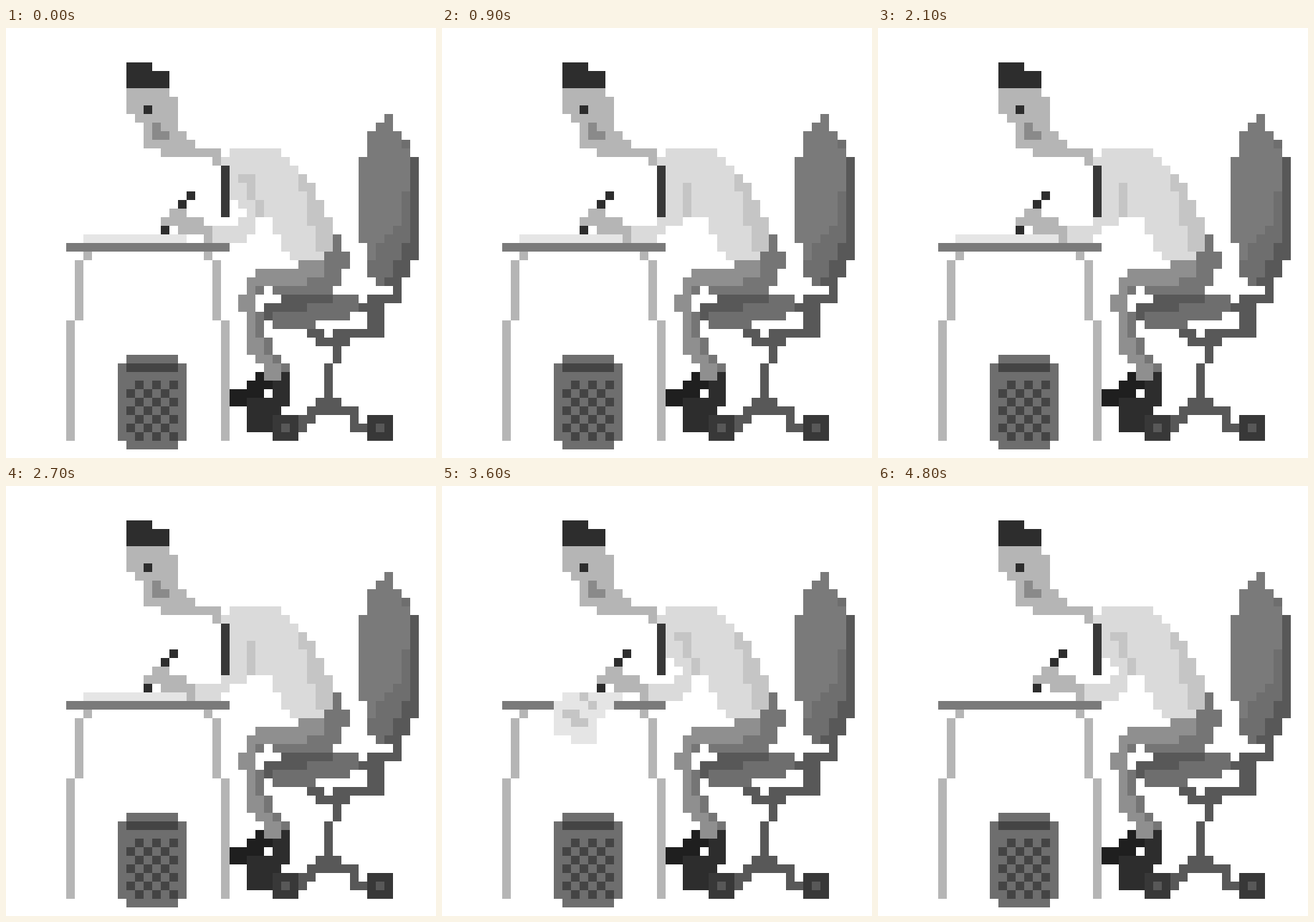
These frames come from a looping animation (600 by 600 pixels, 5.8 s). An HTML page with a canvas:

```html
<!DOCTYPE html>
<html lang="en">
<head>
<meta charset="utf-8">
<title>Writing at the desk</title>
<style>
html, body { margin: 0; width: 100%; height: 100%; overflow: hidden; background: #fff; }
canvas { display: block; width: 600px; height: 600px; }
</style>
</head>
<body>
<canvas id="stage" width="600" height="600"></canvas>
<script>
const ctx = document.getElementById('stage').getContext('2d');
const CELL = 12, STEP = 300, LOOP = 5800, DROP_STEP = 12;

const INK = '#2d2d2d', COAL = '#383838', BLACK = '#1f1f1f', STEEL = '#585858';
const SLATE = '#6e6e6e', GREY = '#7a7a7a', TROUSER = '#757575', CLOTH = '#8f8f8f';
const MOUTH = '#8a8a8a', SKIN = '#b5b5b5', SHADE = '#c5c5c5', SHIRT = '#dadada';
const PAPER = '#e5e5e5', HOLE = '#444444';

// Rectangles are [column, row, width, height] in cells; sizes default to 1.
function fill(color, ...rects) {
  ctx.fillStyle = color;
  for (const [x, y, w = 1, h = 1] of rects) {
    ctx.fillRect(x * CELL, y * CELL, w * CELL, h * CELL);
  }
}

// Fills one row from column x up to, but not including, column end.
const span = (color, row, x, end) => fill(color, [x, row, end - x]);

// Fills a polygon snapped to whole cells, row by row.
function poly(color, ...pts) {
  const ys = pts.map(p => p[1]);
  for (let row = Math.floor(Math.min(...ys)); row < Math.max(...ys); row++) {
    const y = row + 0.5, hits = [];
    pts.forEach(([x0, y0], i) => {
      const [x1, y1] = pts[(i + 1) % pts.length];
      if ((y0 <= y) !== (y1 <= y)) hits.push(x0 + (x1 - x0) * (y - y0) / (y1 - y0));
    });
    if (hits.length > 1) span(color, row, Math.round(Math.min(...hits)), Math.round(Math.max(...hits)));
  }
}

function drawChair() {
  const left = [[44.6, 10], [42.4, 12.5], [41.2, 15.5], [41.3, 24.5]];
  poly(STEEL, ...left, [42.84, 30], [46, 30], [48, 26], [48, 16]);
  poly(SLATE, ...left, [42.84, 30], [44.15, 30], [46.9, 24.5], [47.2, 14.5]);
  poly(GREY, ...left, [42, 27], [42.7, 27], [43, 25.5], [46, 22.5], [47, 14.5]);

  fill(SLATE, [38, 31, 3], [35, 32, 6], [31, 33, 9], [31, 34, 5]);
  fill(STEEL, [32, 31, 6], [30, 32, 5], [30, 33]);
  fill(STEEL, [45, 30], [42, 31, 4], [41, 32], [42, 32, 2, 4], [38, 35, 4], [35, 35, 2]);
  fill(STEEL, [36, 36, 4], [38, 37, 1, 2], [37, 39, 1, 4], [36, 43, 3], [35, 44, 6]);
  fill(STEEL, [34, 45, 2], [34, 46], [40, 45], [40, 46, 2]);
}

function drawWheel(x) {
  fill(COAL, [x, 45, 3, 3]);
  fill(STEEL, [x + 1, 46]);
}

function drawLegs() {
  fill(TROUSER, [38, 24, 1, 2], [37, 26, 3, 2], [35, 28, 4, 2], [31, 30, 7], [29, 30]);
  fill(CLOTH, [34, 27, 3], [29, 28, 8], [28, 29, 7], [28, 30], [27, 31, 2, 2]);
  for (let row = 33; row < 40; row++) {
    const bend = Math.round(3 * ((row - 33) / 6) ** 2);
    span(CLOTH, row, 28 + Math.max(0, bend - 1), 29 + bend);
    fill(TROUSER, [29 + bend, row]);
  }
  fill(CLOTH, [30, 40, 2]);
  fill(BLACK, [29, 40], [28, 41, 3], [26, 42, 4], [26, 43, 2]);
  fill(INK, [32, 40], [31, 41, 2, 2], [28, 43, 5], [28, 44, 4], [28, 45, 3, 2]);
}

function drawBody() {
  fill(INK, [14, 4, 3], [14, 5, 5, 2]);
  poly(SKIN, [14, 7], [14, 9.5], [16, 11.5], [16, 13.5], [18, 14.5], [24, 15.5], [24, 16],
    [25, 16], [25, 14.5], [22, 13.5], [20, 11.5], [20, 8.2], [18.8, 7]);
  fill(INK, [16, 9]);
  fill(MOUTH, [17, 11], [17, 12, 2]);

  const back = [[38, 27], [37.9, 22.5], [35.9, 18.5]];
  poly(SHIRT, [26, 14], [26, 18], [28.55, 18], [33.05, 27], ...back, [31.4, 14]);
  fill(SHIRT, [25, 15]);
  poly(SHADE, [33.86, 17], [36.3, 26], [38, 26], ...back.slice(1), [34.4, 17]);
  fill(COAL, [25, 16, 1, 6]);
}

// shift moves the hand left, bend swings the upper arm, cuff ends the forearm.
const poses = [
  { shift: 0, bend: 2, width: 3, cuff: 28, fold: [[27, 17, 2], [28, 18, 1, 2], [29, 20, 1, 2]] },
  { shift: 2, bend: 0, width: 4, cuff: 25, fold: [[28, 18, 1, 4]] },
  { shift: 5, bend: -2, width: 3, cuff: 23, fold: [[28, 18], [27, 19, 2], [27, 20, 3]] }
];

function drawArm({ shift, bend, width, cuff, fold }) {
  for (let row = 18; row < 22; row++) {
    const x = Math.round(25.6 + bend * ((row - 17) / 4) ** 2);
    fill(SHIRT, [x, row, width]);
  }
  span(SHIRT, 22, 25 + bend, Math.min(28 + bend, 29));
  span(SHIRT, 23, 24 - shift, cuff + 1);
  span(SHIRT, 24, 24 - shift, cuff);
  fill(SHADE, ...fold);

  const hand = 18 - shift;
  fill(SKIN, [hand + 1, 21, 2], [hand, 22, 5], [hand + 2, 23, 4], [hand + 5, 24]);
  fill(INK, [hand + 3, 19], [hand + 2, 20], [hand, 23]);
}

function drawDesk() {
  fill(GREY, [7, 25, 19]);
  for (const side of [-1, 1]) {
    const leg = reach => 16 + side * reach;
    fill(SKIN, [leg(7), 26], [leg(8), 27, 1, 7], [leg(9), 34, 1, 14]);
  }
}

function drawBin() {
  fill(SLATE, [14, 38, 6], [13, 39, 8, 9], [14, 48, 6]);
  fill(HOLE, [14, 39, 6]);
  for (let row = 41; row < 48; row++) {
    for (let i = 0; i < 3; i++) fill(HOLE, [14 + row % 2 + i * 2, row]);
  }
}

function drawSheetOnEdge() {
  poly(PAPER, [14.3, 24], [13, 25], [13, 29], [15, 29.2], [15, 30], [18, 30], [18, 27.5], [21.4, 24]);
  fill(SHADE, [16, 24], [17, 25], [14, 26, 2], [15, 27, 2]);
}

// A crumpled ball that narrows as it sinks behind the front of the bin.
function drawFallingBall(k) {
  const cx = 17 + Math.min(0.5, (k - 1) / 2), cy = 24 + 7.5 * k - 0.6 * k * k;
  const rx = 4.8 - 0.7 * k, ry = 5;
  const rim = Array.from({ length: 16 }, (_, i) => {
    const a = i * Math.PI / 8, r = 1 + 0.06 * Math.sin(3 * a + k);
    return [cx + rx * r * Math.cos(a), cy + ry * r * Math.sin(a)];
  });
  ctx.save();
  ctx.beginPath();
  ctx.rect(0, 0, 600, 40 * CELL);
  ctx.clip();
  poly(PAPER, ...rim);
  for (let i = 0; i < 4; i++) {
    fill(SHADE, [Math.round(cx - 0.5 + 1.5 * Math.sin(2.4 * i + k)), Math.round(cy) - 3 + i, 1 + i % 2]);
  }
  ctx.restore();
}

function draw(time) {
  const step = Math.floor((time % LOOP) / STEP);
  const drop = step - DROP_STEP;
  const writing = drop < 0;
  ctx.fillStyle = '#fff';
  ctx.fillRect(0, 0, 600, 600);
  drawChair();
  drawBody();
  drawLegs();
  drawWheel(31);
  drawWheel(42);
  if (writing) fill(PAPER, [9, 24, 12]);
  drawArm(poses[writing ? [0, 1, 2, 1][step % 4] : 0]);
  drawDesk();
  drawBin();
  if (drop === 0) drawSheetOnEdge();
  if (drop > 0 && drop < 4) drawFallingBall(drop);
}

const start = performance.now();
function tick() {
  draw(performance.now() - start);
  requestAnimationFrame(tick);
}
tick();
</script>
</body>
</html>
```
